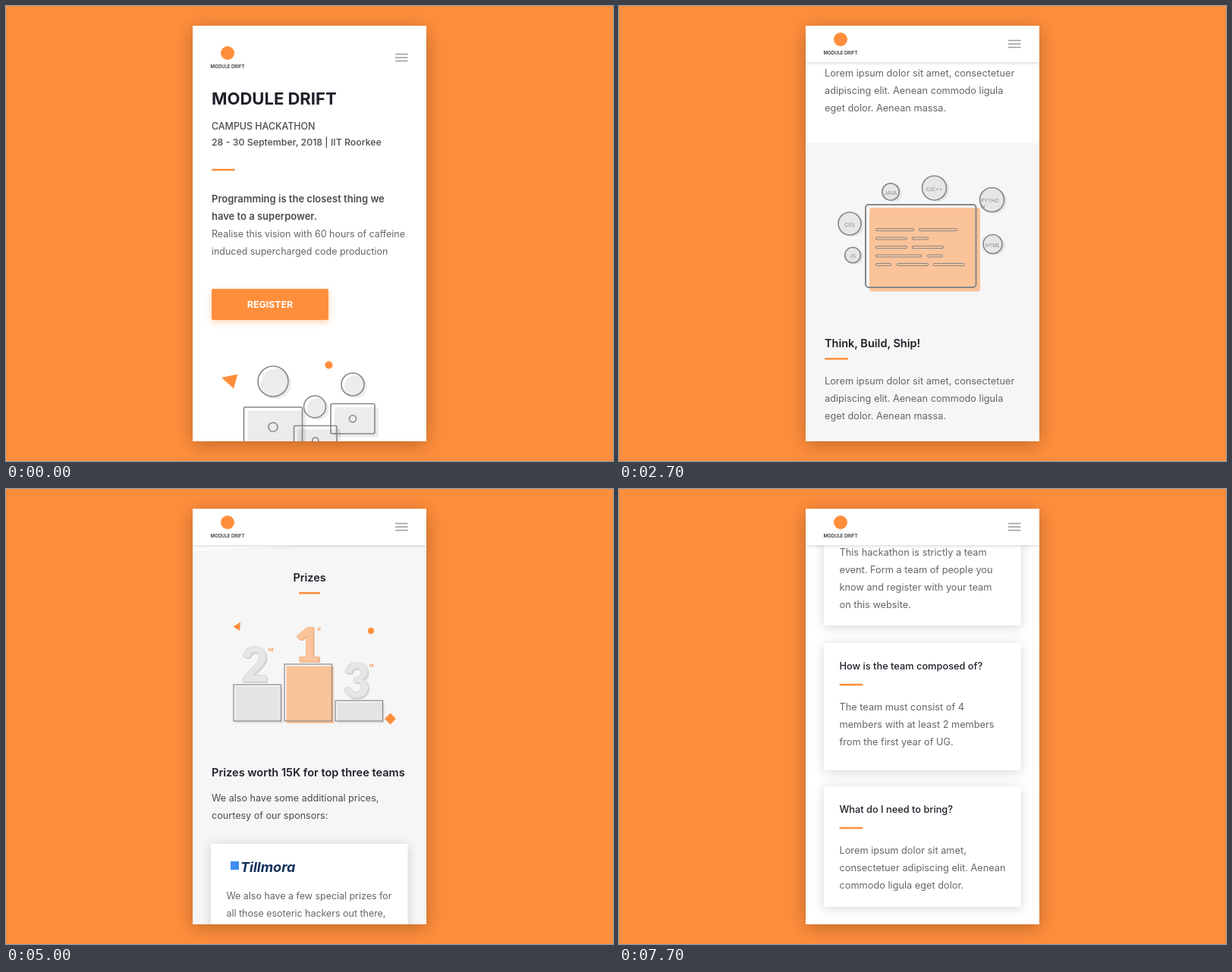
These frames come from a looping animation (800 by 600 pixels, 8 s). An HTML page:

```html
<!DOCTYPE html>
<html lang="en">
<head>
<meta charset="utf-8">
<title>Hackathon mobile site</title>
<style>
  html, body { margin: 0; width: 100%; height: 100%; overflow: hidden; background: #ff8e3c; }
  svg { display: block; width: 800px; height: 600px; font-family: Inter, Roboto, sans-serif; }
  text { white-space: pre; }
  .screen { filter: drop-shadow(0 4px 13px rgba(0, 0, 0, .27)); }
  .card { filter: drop-shadow(0 2px 7.5px rgba(0, 0, 0, .16)); }
  .bar { filter: drop-shadow(0 1px 2px rgba(0, 0, 0, .17)); }
  .cta { filter: drop-shadow(0 3px 4px rgba(255, 142, 60, .4)); }
  .line { fill: none; stroke: #87878b; stroke-width: 1.6; }
</style>
</head>
<body>
<svg id="stage" viewBox="0 0 800 600"></svg>
<script>
const ORANGE = '#ff8e3c', PEACH = '#fbc399', DARK = '#20202a', MID = '#4b4b51', SOFT = '#66666a';
const GRAY = '#f6f6f6', SHADE = 'rgba(0,0,0,.075)', LOOP = 8000, STEP = 100;
const BODY = 12.75, SMALL = 12.45;

// Drawing helpers; text is placed by the middle of its capitals.
const text = (x, y, str, size = BODY, weight = 400, fill = SOFT, extra = '') =>
  `<text x="${x}" y="${y + size * .364}" font-size="${size}" font-weight="${weight}" fill="${fill}" ${extra}>${str}</text>`;
const mid = (x, y, str, size, weight, fill, extra = '') =>
  text(x, y, str, size, weight, fill, 'text-anchor="middle" ' + extra);
const lines = (x, y, list, size = BODY, fill = SOFT) =>
  list.map((s, i) => text(x, y + i * 23.1, s, size, 400, fill)).join('');
const bold = s => `<tspan font-weight="600" fill="${MID}">${s}</tspan>`;
const rect = (x, y, w, h, fill, rx = 0, extra = '') =>
  `<rect x="${x}" y="${y}" width="${w}" height="${h}" rx="${rx}" fill="${fill}" ${extra}/>`;
const frame = (x, y, w, h, rx = 0, width = 1.6) =>
  `<rect class="line" x="${x}" y="${y}" width="${w}" height="${h}" rx="${rx}" style="stroke-width:${width}"/>`;
const dot = (x, y, r, fill) => `<circle cx="${x}" cy="${y}" r="${r}" fill="${fill}"/>`;
const ring = (x, y, r) => `<circle class="line" cx="${x}" cy="${y}" r="${r}"/>`;
const path = (d, extra) => `<path d="${d}" ${extra}/>`;
const at = (y, body, x = 0) => `<g transform="translate(${x} ${y})">${body}</g>`;
const dash = (x, y, w = 31) => rect(x, y - 1.3, w, 2.6, ORANGE, 1);
const title = (y, str) => mid(400, y, str, 14.4, 600, DARK) + dash(386, y + 20.3, 28);

const brand = () => dot(292, 62, 9, ORANGE) + mid(292, 80, 'MODULE DRIFT', 6, 600, '#333');
const menu = () => path('M513 63.5h16.5M513 68h16.5M513 72.5h16.5', 'stroke="#9a9a9a" stroke-width="1.7"');

function hero() {
  const head = (x, y, r) => dot(x + 4, y + 3, r, SHADE) + ring(x, y, r);
  const laptop = (x, y, w, h, r) => rect(x + 5, y + 4.5, w, h, SHADE, 2) + frame(x, y, w, h, 2) + ring(x + w / 2, y + h / 2, r);
  return brand() + menu() +
    text(271, 122, 'MODULE DRIFT', 22, 700, DARK) +
    text(271, 158, 'CAMPUS HACKATHON', 12.4, 500, MID) +
    text(271, 179.5, '28 - 30 September, 2018 | IIT Roorkee', 12.35, 500, MID) +
    dash(271, 216) +
    text(271, 254, 'Programming is the closest thing we', 13, 600, MID) +
    text(271, 277, 'have to a superpower.', 13, 600, MID) +
    lines(271, 300, ['Realise this vision with 60 hours of caffeine', 'induced supercharged code production'], SMALL) +
    rect(271, 373, 154, 41, ORANGE, 2, 'class="cta"') + mid(348, 393.5, 'REGISTER', 12.4, 700, '#fff') +
    path('M284 490L305.5 485.5L300 504.5Z', `fill="${ORANGE}"`) + dot(425.5, 473.5, 5, ORANGE) +
    head(352, 495, 20) + head(457, 499, 15) + head(407, 528.5, 14.5) +
    laptop(313.5, 529, 77, 52.5, 6) + laptop(428, 524.5, 58, 39.5, 4.5) + laptop(379.5, 553.5, 56.5, 39, 4) +
    rect(453, 590, 17, 17, ORANGE, 0, 'transform="rotate(31 461.5 598.5)"');
}

function bulb() {
  const glass = 'M336.5 273.5V261C336.5 247 315 240 315 216A41 41 0 0 1 397 216C397 240 375.5 247 375.5 261V273.5Z';
  const cap = 'M340.5 276H371.5A5 5 0 0 1 371.5 286H340.5A5 5 0 0 1 340.5 276Z';
  const foot = 'M338 289.5H374C374 297 370 300 364 300C363 304 360 307 356 307C352 307 349 304 348 300C342 300 338 297 338 289.5Z';
  const d = glass + cap + foot;
  const rays = 'M362.5 148V168M322 157L332 174M400 157L390 174M298 186L315 195M424 187L407 195M291 220.5L309 219.5M412 219.5L432 221M302 258L319 248';
  const rows = [[395, 43, 442, 24, 470, 23.5], [395, 24, 424, 34, 463, 30.5]];
  let wall = '';
  for (let r = 0; r < 3; r++) {
    for (let i = 0; i < 6; i += 2) {
      const [x, w] = rows[r % 2].slice(i, i + 2), y = 250 + r * 20.6;
      wall += rect(x + 2, y + 1.5, w, 14.5, '#dedede', 2) + rect(x, y, w, 14.5, '#e5e5e5', 2) + frame(x, y, w, 14.5, 2, 1);
    }
  }
  return path(rays, 'stroke="#e1e1e1" stroke-width="1.8"') +
    at(3.5, path(d, `fill="${PEACH}"`), 6.5) + path(d, 'class="line"') + wall;
}

function clipboard() {
  let rows = '';
  for (let i = 0; i < 5; i++) rows += frame(395, 594 + i * 22, i % 2 ? 44 : 60, 4, 2, 1);
  return rect(383, 567, 95, 8, PEACH, 4) + rect(388, 574, 85, 149, PEACH, 3) +
    frame(377.5, 563.5, 95.5, 8, 4) + frame(382.5, 571.5, 86, 148, 3) + rows;
}

function editor() {
  const code = [[338, 51, 395, 51], [338, 42, 386, 22], [338, 42, 386, 42], [338, 61, 406, 21], [338, 21, 366, 42, 414, 42]];
  const tags = [[358, 245, 11.2, 'JAVA'], [415.5, 240, 16, 'C/C++'], [491.5, 255.5, 16, ''],
    [304, 287, 15, 'CSS'], [308, 328.5, 10.3, 'JS'], [492.5, 314, 12.5, 'HTML']];
  let out = rect(330, 266, 146, 110.5, PEACH, 4) + frame(325, 262, 145.5, 109, 4, 2);
  code.forEach((row, n) => {
    for (let i = 0; i < row.length; i += 2) out += frame(row[i] + .5, 293.5 + n * 11.5, row[i + 1] - 1, 3, 1.5, 1.1);
  });
  for (const [x, y, r, name] of tags)
    out += dot(x + 3.5, y + 2, r, '#e3e3e3') + dot(x, y, r, '#e6e6e6') + ring(x, y, r) +
      mid(x, y + 1.5, name, 6.8, 400, '#88888c');
  return out + text(477, 257, 'PYTHO', 6.8, 400, '#88888c') + text(477, 265, 'N', 6.8, 400, '#88888c');
}

function blurb(y) {
  return text(271, y, 'Think, Build, Ship!', 14.5, 600, DARK) + dash(271, y + 20.2) +
    lines(271, y + 49.5, ['Lorem ipsum dolor sit amet, consectetuer', 'adipiscing elit. Aenean commodo ligula', 'eget dolor. Aenean massa.']);
}

function timeline() {
  const days = [
    ['FRIDAY', '28th', 1996, [['8:00 PM', 'Registration ends,', 'Teams formed'], ['9:00 PM', 'Hackathon starts']]],
    ['SATURDAY', '29th', 2256, [['12:00 AM', 'Mid-night snacks'], ['8:00 AM', 'Breakfast'], ['1:00 PM', 'Lunch'],
      ['5:00 PM', 'Evening snacks'], ['8:00 PM', 'Dinner'], ['11:00 PM', 'Mentor session']]],
    ['SUNDAY', '30th', 2802, [['8:00 AM', 'Breakfast'], ['10:00 AM', 'Hackathon ends'], ['1:00 PM', 'Final judging']]]
  ];
  let out = title(1915.5, 'Timeline');
  for (const [day, date, top, events] of days) {
    out += text(297, top, `${day}, <tspan fill="${DARK}" font-weight="600">${date} Sept.</tspan>`, 14, 700, ORANGE);
    let y = top + 54.5, last = 0;
    for (const [time, ...what] of events) {
      if (last) out += rect(304, last + 8, 2, y - last - 16, ORANGE);
      out += `<circle cx="305" cy="${y}" r="7.2" fill="none" stroke="${ORANGE}" stroke-width="1.9"/>` +
        text(341, y, time, 15.8, 500, DARK);
      what.forEach((s, i) => out += text(341, y + 30 + i * 28.5, s, 16.3, 400, SOFT));
      last = y;
      y += 50 + what.length * 28;
    }
  }
  return out;
}

function podium() {
  const block = (x, y, w, fill) => rect(x + 2.5, y + 2.5, w, 306.5 - y, fill) + frame(x, y, w, 306 - y, 0, 1.2);
  const digit = (x, y, n, fill, edge) => {
    const style = 'style="font-family:Lato,sans-serif"';
    return mid(x + 1.5, y + 1.5, n, 62, 900, edge, style) +
      mid(x, y, n, 62, 900, fill, style + ` stroke="${edge}" stroke-width=".7"`);
  };
  return path('M299.5 181.5L309 175.5L308 187Z', `fill="${ORANGE}"`) + dot(481, 187, 4.2, ORANGE) +
    rect(501.2, 297.7, 10.6, 10.6, ORANGE, 0, 'transform="rotate(45 506.5 303)"') +
    block(300, 258, 62.5, '#e4e4e4') + block(367, 231, 62.5, PEACH) + block(434, 279, 62.5, '#e4e4e4') +
    digit(328, 231.5, '2', '#e6e6e6', '#d2d2d2') + digit(398, 205, '1', PEACH, '#e9b48c') + digit(462, 252.5, '3', '#e6e6e6', '#d2d2d2') +
    text(345.5, 212, 'nd', 5.6, 600, ORANGE) + text(410, 185, 'st', 5.6, 600, ORANGE) + text(479, 233, 'rd', 5.6, 600, ORANGE);
}

const card = (y, h, body) => at(y, rect(270, 0, 259.5, h, '#fff', 2, 'class="card"') + body);
const square = fill => rect(295.5, 19, 48, 48, fill, 4);
const question = (y, h, ask, answer) =>
  card(y, h, text(290.5, 30, ask, 12.8, 500, DARK) + dash(290.5, 55) + lines(290.5, 84, answer));

function prizes() {
  return at(3029, title(117, 'Prizes') + podium() +
      text(271, 374, 'Prizes worth 15K for top three teams', 14.55, 600, DARK) +
      lines(271, 407, ['We also have some additional prices,', 'courtesy of our sponsors:'], 12.6, MID)) +
    card(3497, 165, rect(296, 23, 11, 11, '#3d8df5') +
      text(309, 30, 'Tillmora', 18, 700, '#12305c', 'font-style="italic"') +
      lines(290.5, 68, ['We also have a few special prizes for', 'all those esoteric hackers out there,', 'with cash rewards for the best use', 'of payments in a project.'], SMALL)) +
    card(3683, 190, square('#3b5f9c') +
      lines(290.5, 94, [bold('Nolvra will be giving $100'), 'and Nolvra T-shirts for the best app', 'built using the Nolvra GraphQL', 'Engine.'], SMALL)) +
    card(3894, 170, square('#2a3457') +
      lines(290.5, 94, [bold('LogicMeadow T-shirts to top 5'), bold('teams.'), 'Swag for all participants (Stickers).'], SMALL)) +
    card(4085, 192, square('#198a50') +
      lines(290.5, 94, [bold('Zulip will be giving $100') + ' for the', 'best bot built on top of Zulip during', 'the hackathon. More details can be', `found ${bold('here')}.`], SMALL));
}

function faq() {
  return title(4382, 'FAQs') +
    question(4440, 159, 'Who can participate?', ['Lorem ipsum dolor sit amet,', 'consectetuer adipiscing elit. Aenean', 'commodo ligula eget dolor.']) +
    question(4620, 182, 'What is the entry fee?', ['There is no fee for this hackathon.', 'Food and snacks are provided to', 'every team at the venue for the', 'whole event.']) +
    question(4823, 181, 'Can I take part alone?', ['This hackathon is strictly a team', 'event. Form a team of people you', 'know and register with your team', 'on this website.']) +
    question(5027, 168, 'How is the team composed of?', ['The team must consist of 4', 'members with at least 2 members', 'from the first year of UG.']) +
    question(5216, 159, 'What do I need to bring?', ['Lorem ipsum dolor sit amet,', 'consectetuer adipiscing elit. Aenean', 'commodo ligula eget dolor.']);
}

const page = path('M246 655.5L554 640V1042H246ZM246 1465H554V1863H246ZM246 3110.5L554 3095V4330H246Z', `fill="${GRAY}"`) +
  hero() + at(530, bulb() + blurb(378) + clipboard()) + blurb(1323) +
  at(1284, editor() + blurb(445)) + timeline() + prizes() + faq();

document.getElementById('stage').innerHTML =
  `<clipPath id="view">${rect(246, 26, 308, 548, '#fff')}</clipPath>` +
  rect(0, 0, 800, 600, ORANGE) + rect(246, 26, 308, 548, '#fff', 0, 'class="screen"') +
  `<g clip-path="url(#view)"><g id="page">${page}</g>` +
  `<g id="bar">${rect(246, 26, 308, 48, '#fff', 0, 'class="bar"')}${at(-18, brand() + menu())}</g></g>`;

const pageEl = document.getElementById('page'), barEl = document.getElementById('bar');

// Scroll moves: first change in ms, number of steps, resting offset.
const moves = [[1000, 8, 635], [2000, 8, 1284], [3000, 4, 1800], [3700, 7, 2500],
  [4700, 4, 3029], [5400, 7, 3728], [6400, 4, 4280], [7000, 8, 4824]];
const clamp = v => Math.max(0, Math.min(1, v));
const ease = v => (1 - Math.cos(Math.PI * clamp(v))) / 2;

function scrollAt(t) {
  let y = 0;
  for (const [start, steps, to] of moves)
    y += (to - y) * ease((t - start + 50) / (steps * STEP - 50));
  return Math.round(y);
}

function draw(ms) {
  const t = Math.floor(ms % LOOP / STEP) * STEP;
  pageEl.setAttribute('transform', `translate(0 ${-scrollAt(t)})`);
  barEl.setAttribute('transform', `translate(0 ${-54 * (1 - ease((t - 1500) / 200))})`);
}

const begin = performance.now();
function tick() {
  draw(performance.now() - begin);
  requestAnimationFrame(tick);
}
tick();
</script>
</body>
</html>
```
